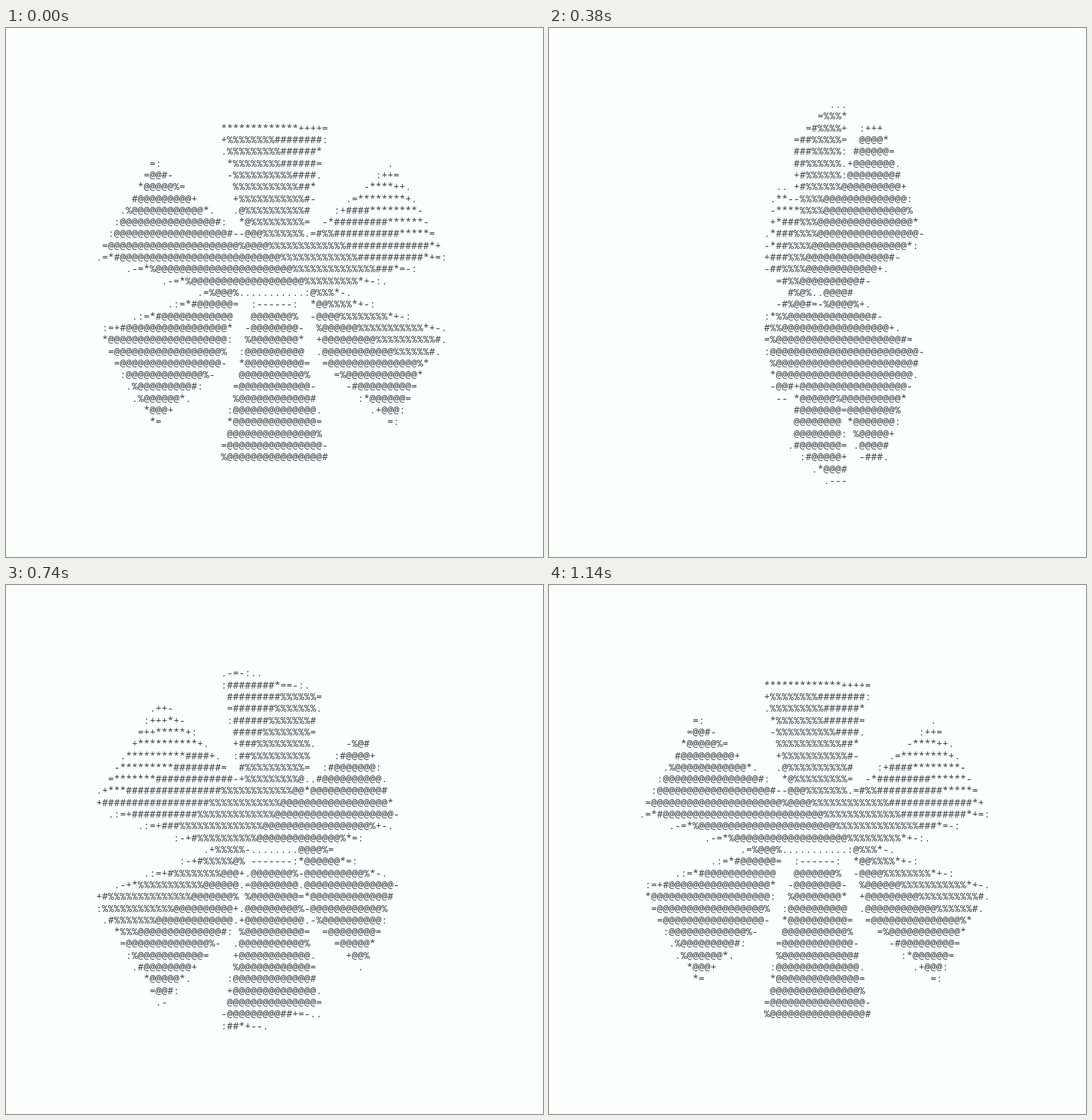
Write an HTML page with a canvas that moves like this. It is 700x689 px and loops after 1160 ms.

```html
<!DOCTYPE html>
<html lang="en">
<head>
<meta charset="utf-8">
<title>Rotating ASCII emblem</title>
<style>
  html, body { margin: 0; height: 100%; overflow: hidden; background: #fdfefe; }
  canvas { display: block; }
</style>
</head>
<body>
<canvas id="stage" width="700" height="689"></canvas>
<script>
const ctx = document.getElementById('stage').getContext('2d');
const COLS = 90, ROWS = 45, CELL_W = 7.75, CELL_H = 689 / ROWS, LEFT = 1.25;
const CX = 349.2, CY = 346;
const RAMP = ' .:-=+*#%@';
const LOOP = 1160, START = 0.02, STEP = 9.22 * Math.PI / 180;
const CAMERA = 610, HALF = 10;             // camera distance, half thickness
const RADIUS = 216.8, BASE = 24.4, FLARE = 0.205;
const SUB_X = 4, SUB_Y = 5;

// Five upper arms share a body; the bottom arm stands apart behind a gap.
const arms = [-150, -90, -30, 30, 150].map(deg => {
  const a = deg * Math.PI / 180;
  return [Math.cos(a), Math.sin(a)];
});

function inside(x, y) {
  const ax = Math.abs(x), w = BASE + FLARE * y;
  if (y > 14.4 && y < RADIUS && ax < w) return true;
  if (y > -7.3 && ax < w + 22.8) return false;
  for (const [c, s] of arms) {
    const d = x * c + y * s;
    if (d >= 0 && d < RADIUS && Math.abs(y * c - x * s) < BASE + FLARE * d) return true;
  }
  return false;
}

// Ink grows with the (skewed) distance from a light at the upper right.
function ink(x, y) {
  const dx = x - 175, dy = y + 165;
  return Math.min(9.9, 3.85 + 0.326 * Math.sqrt(Math.sqrt(dx * dx + dy * dy - dx * dy)));
}

// Ink met by the ray through screen point (x, y), or 0.
function trace(x, y, c, s) {
  const oz = CAMERA * c, dz = x * s - oz;
  const ox = -CAMERA * s, dx = x * c - ox;
  const face = HALF * Math.sign(c);
  let near = (face - oz) / dz, far = (-face - oz) / dz;
  if (near < 0) return 0;
  if (far < 0) far = 2;
  near = Math.max(near, 0.6);
  far = Math.min(far, 1.4);
  if (near >= far) return 0;
  const n = Math.ceil((far - near) * CAMERA / 4);
  for (let i = 0; i <= n; i++) {
    const t = near + (far - near) * i / n;
    const px = ox + dx * t, py = y * t;
    if (inside(px, py)) return ink(px, py);
  }
  return 0;
}

function render(angle) {
  const c = Math.cos(angle), s = Math.sin(angle), lines = [];
  for (let row = 0; row < ROWS; row++) {
    let line = '';
    for (let col = 0; col < COLS; col++) {
      const x0 = LEFT + col * CELL_W - CX, y0 = row * CELL_H - CY;
      let sum = 0;
      if (Math.abs(x0) < 260 && Math.abs(y0) < 270) {
        for (let i = 0; i < SUB_X; i++) {
          for (let j = 0; j < SUB_Y; j++) {
            sum += trace(x0 + (i + 0.5) * CELL_W / SUB_X, y0 + (j + 0.5) * CELL_H / SUB_Y, c, s);
          }
        }
      }
      line += RAMP[Math.floor(sum / (SUB_X * SUB_Y))];
    }
    lines.push(line);
  }
  return lines;
}

// The turn advances in steps of about 30 ms and rests at the loop's ends.
function poseAt(t) {
  if (t < 60 || t >= 1140) return 0;
  return t < 600 ? Math.floor((t - 20) / 30) : Math.max(19, Math.floor((t - 40) / 30));
}

const cache = [];
let shown = -1;

function draw(now) {
  const pose = poseAt(now % LOOP);
  if (pose !== shown) {
    shown = pose;
    const lines = cache[pose] ||= render(START + pose * STEP);
    ctx.fillStyle = '#fdfefe';
    ctx.fillRect(0, 0, 700, 689);
    ctx.fillStyle = '#3f3f46';
    ctx.font = '12.9px "Noto Sans Mono", "DejaVu Sans Mono", monospace';
    lines.forEach((line, row) => {
      for (let col = 0; col < COLS; col++) {
        if (line[col] !== ' ') {
          ctx.fillText(line[col], LEFT + col * CELL_W, (row + 0.5) * CELL_H + 4.5);
        }
      }
    });
  }
  requestAnimationFrame(draw);
}
requestAnimationFrame(draw);
</script>
</body>
</html>
```
